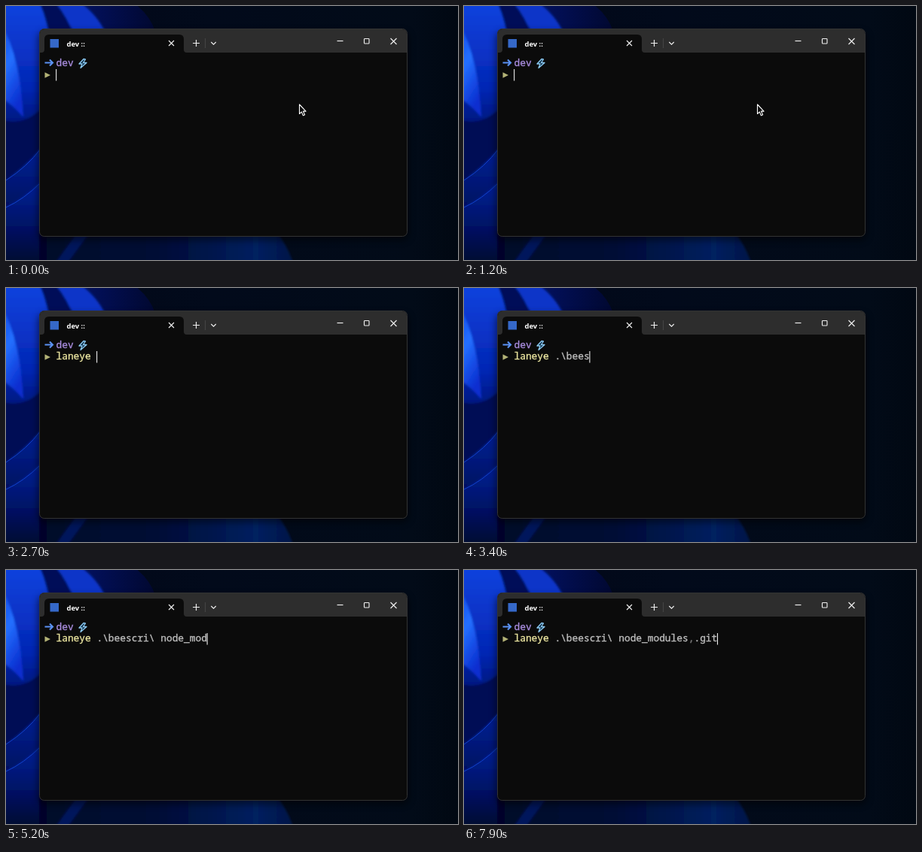
Write an HTML page that moves like this. It is 600 by 338 pixels and loops after 8000 ms.

```html
<!DOCTYPE html>
<html lang="en">
<head>
<meta charset="utf-8">
<title>Terminal</title>
<style>
  html, body { margin: 0; height: 100%; overflow: hidden; background: #020a19; }
  svg { display: block; width: 100vw; height: 100vh; }
  .mono { font: 500 12.85px "Noto Sans Mono", "DejaVu Sans Mono", monospace; white-space: pre; }
  .mono, .mono tspan { stroke-width: .35; }
  .tab { font: 700 9.4px "Open Sans", sans-serif; fill: #fff; }
  .line { fill: none; stroke: #eee; }
  .name { fill: #a78bdc; stroke: #a78bdc; }
  .cmd { fill: #eee8a2; stroke: #eee8a2; }
  .arg { fill: #bebebe; stroke: #bebebe; }
  .dim { fill: #777; stroke: #777; }
</style>
</head>
<body>
<svg viewBox="0 0 600 338">
  <defs>
    <linearGradient id="night">
      <stop offset="0" stop-color="#010718"/>
      <stop offset=".45" stop-color="#020a1b"/>
      <stop offset=".9" stop-color="#020b18"/>
      <stop offset="1" stop-color="#010812"/>
    </linearGradient>
    <linearGradient id="outer">
      <stop offset="0" stop-color="#0526a8"/>
      <stop offset=".6" stop-color="#020f58"/>
      <stop offset="1" stop-color="#010830"/>
    </linearGradient>
    <linearGradient id="bright" x2=".4" y2="1">
      <stop offset="0" stop-color="#0b42e8"/>
      <stop offset=".5" stop-color="#2470ff"/>
      <stop offset="1" stop-color="#0a2fd0"/>
    </linearGradient>
    <linearGradient id="side" x2="0" y2="1">
      <stop offset="0" stop-color="#0a44e0"/>
      <stop offset=".6" stop-color="#0526b4"/>
      <stop offset="1" stop-color="#020c54"/>
    </linearGradient>
    <linearGradient id="fade" x2="0" y2="1">
      <stop offset="0" stop-color="#0526a4"/>
      <stop offset=".6" stop-color="#021060"/>
      <stop offset="1" stop-color="#010526"/>
    </linearGradient>
    <linearGradient id="low">
      <stop offset="0" stop-color="#01062a"/>
      <stop offset=".45" stop-color="#010a34"/>
      <stop offset=".85" stop-color="#03205f"/>
      <stop offset="1" stop-color="#021446"/>
    </linearGradient>
    <filter id="soft" x="-20%" y="-20%" width="140%" height="140%"><feGaussianBlur stdDeviation="5"/></filter>
    <filter id="blend"><feGaussianBlur stdDeviation="1.5"/></filter>
  </defs>

  <!-- wallpaper -->
  <rect width="600" height="338" fill="url(#night)"/>
  <path d="M-9 -9H162Q190 8 198 34V60H-9Z" fill="url(#outer)"/>
  <g filter="url(#blend)">
    <path d="M58 -9H92Q122 10 134 40H92Q82 16 58 -9Z" fill="#0a36c8"/>
    <path d="M40 -9H62Q82 14 90 40H60Z" fill="#020f58"/>
    <path d="M-9 -9H42Q56 18 60 60V150Q30 170 -9 190Z" fill="url(#side)"/>
    <path d="M-9 20Q18 60 23 148Q8 130 -9 120Z" fill="url(#bright)"/>
    <path d="M-9 150Q30 165 60 120V190Q30 215 -9 235Z" fill="#020d54"/>
    <path d="M-9 236Q28 215 60 172V290L-9 330Z" fill="url(#fade)"/>
    <path d="M-9 270Q24 258 60 220V350H-9Z" fill="url(#fade)"/>
    <path d="M44 300H358Q374 318 383 347H44Z" fill="url(#low)"/>
    <path d="M62 347L96 300H112L78 347Z" fill="#03145c"/>
  </g>
  <path d="M0 232Q28 214 46 190M0 268Q24 257 46 235" fill="none" stroke="#1240cc"/>

  <!-- window -->
  <rect x="42" y="34" width="493" height="278" rx="9" fill="#000" opacity=".5" filter="url(#soft)"/>
  <rect x="44.5" y="30.5" width="488" height="276" rx="6" fill="#0b0b0b"/>
  <path d="M45 62V37Q45 31 51 31H526Q532 31 532 37V62Z" fill="#2d2d2d"/>
  <path d="M47 62Q51 62 51 58V44Q51 38 57 38H230Q236 38 236 44V58Q236 62 240 62Z" fill="#0b0b0b"/>
  <rect x="44.5" y="30.5" width="488" height="276" rx="6" fill="none" stroke="#333"/>
  <rect x="58.5" y="44" width="11.5" height="11.5" fill="#3568c8"/>
  <text class="tab" x="80.5" y="53.5">dev ::</text>
  <g class="line" stroke-width="1.15">
    <path d="M216 46l7 7m0-7l-7 7"/>
    <path d="M248 49.5h9M252.5 45v9"/>
    <path d="M264.5 43v13" stroke="#444"/>
    <path d="M272.3 48l3.2 3.2 3.2-3.2"/>
    <path d="M439.5 46.5h8"/>
    <rect x="475.5" y="43.5" width="6.5" height="6.5" rx=".8"/>
    <path d="M510.5 43l8 8m0-8l-8 8"/>
  </g>

  <!-- prompt -->
  <path d="M51.5 75.5H62M58 71.500l4 4-4 4" fill="none" stroke="#5b92f5" stroke-width="2.1"/>
  <text class="mono name" x="66.5" y="80">dev</text>
  <path d="M103 70.5L97 77h4l-2 5.500 8-7h-4.500l3-4.500Z" fill="#12334c" stroke="#8ccaf2" stroke-width="1.3" stroke-linejoin="round"/>
  <path d="M51.5 88.2L59 92l-7.5 3.8Z" fill="#b3b276"/>
  <text class="mono" x="66.5" y="95.3"><tspan id="cmd" class="cmd"/><tspan id="args" class="arg"/><tspan id="comma" class="dim"/><tspan id="rest" class="arg"/></text>
  <rect id="caret" y="84" width="1.1" height="15.5" fill="#eee"/>

  <path id="pointer" d="M389.5 131v12.500l2.800-2.600 2.100 4.900 2.200-1-2.100-4.700h3.600Z" fill="#0c0c0c" stroke="#fff" stroke-width="1.1" stroke-linejoin="round"/>
</svg>
<script>
const LOOP = 8000, CHAR = 7.71, LEFT = 66.5;
const line = "laneye .\\beescri\\ node_modules,.git";
const comma = line.indexOf(",");
const parts = { cmd: [0, 7], args: [7, comma], comma: [comma, comma + 1], rest: [comma + 1, line.length] };

// bursts of typing: start, interval, number of keys
const keys = [
  [1400, 120, 3], [1900, 200, 4], [2800, 110, 12], [4300, 150, 8],
  [5700, 0, 1], [6500, 250, 3], [7300, 0, 1], [7700, 90, 3]
].flatMap(([start, gap, n]) => Array.from({ length: n }, (_, i) => start + i * gap));

const $ = id => document.getElementById(id);
const show = (id, on) => $(id).style.visibility = on ? "visible" : "hidden";
const begin = performance.now();

function draw() {
  const t = (performance.now() - begin) % LOOP;
  const typed = keys.filter(k => k <= t).length;
  const shown = line.slice(0, typed);
  for (const id in parts) $(id).textContent = shown.slice(...parts[id]);

  // typing hides the pointer, and every key press restarts the blink
  show("pointer", !typed);
  const idle = t - (typed ? keys[typed - 1] : 0);
  $("caret").setAttribute("x", LEFT + typed * CHAR - 0.4);
  show("caret", idle % 1000 < 530);
  requestAnimationFrame(draw);
}
draw();
</script>
</body>
</html>
```
